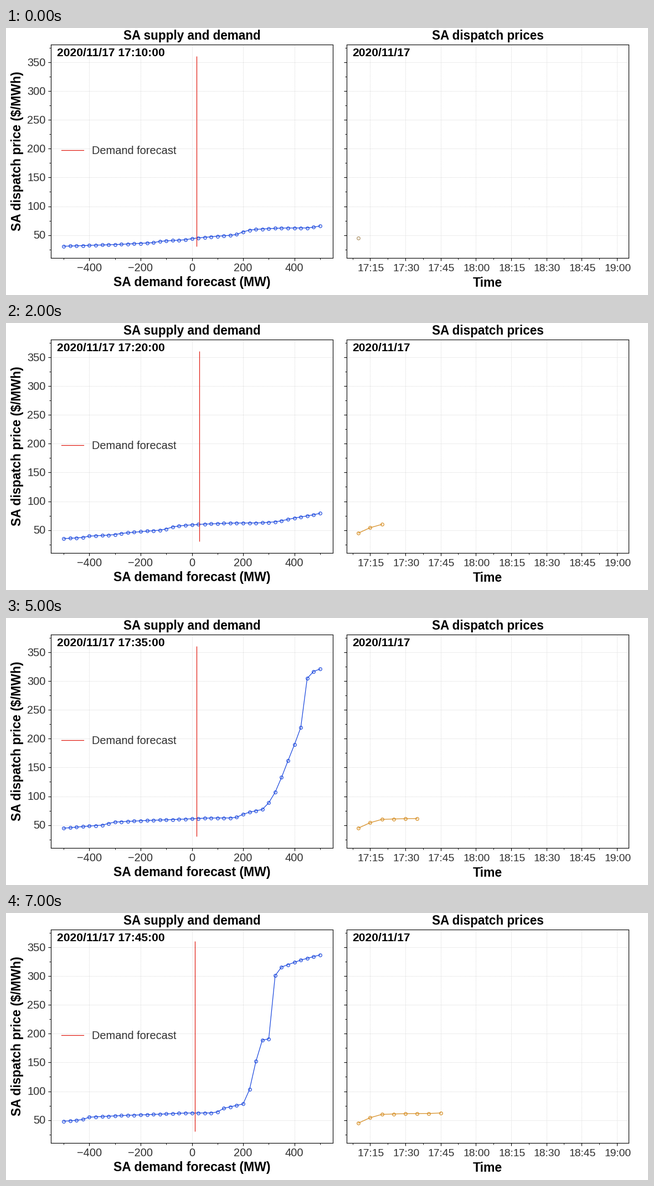
These frames come from a looping animation (1159 by 483 pixels, 8 s). A matplotlib script:

```python
import numpy as np
import matplotlib.pyplot as plt
from matplotlib.animation import FuncAnimation
from matplotlib.ticker import MultipleLocator

W, H, DPI = 1159, 483, 64
PX = 72 / DPI  # points per pixel
plt.rcParams["font.family"] = "Liberation Sans"

TOP, BOTTOM, AXES_WIDTH = 30, 416, 509
LEFT_SUPPLY, LEFT_PRICE = 81, 615
Y_LIM = (10.2, 381)
BLUE, RED = "#1644dd", "#e01a10"
TAN, ORANGE = np.array([0.67, 0.56, 0.38]), np.array([0.835, 0.54, 0.11])

DEMAND = np.arange(-500, 501, 25)
MINUTES = np.arange(10, 46, 5)  # after 17:00

# Bid stack at the end of the loop: key points of demand and price.
STACK = np.array([
    (-1100, 30.6), (-870, 34), (-750, 36.8), (-720, 39.5), (-630, 41.5),
    (-590, 44.5), (-500, 48), (-430, 50.2), (-402, 55), (-275, 57.8),
    (-125, 60.2), (-25, 62.2), (75, 62.4), (105, 64.5), (125, 70.5),
    (200, 78), (225, 103), (250, 152), (275, 189), (300, 191),
    (325, 301), (350, 316), (425, 328), (500, 337)]).T

# How far right of that each price level still lies at a given minute.
DRIFT_PRICES = (55, 60.5, 66, 150)
DRIFT = {10: (600, 370, 390, 800), 15: (430, 180, 290, 800),
         25: (210, 130, 220, 270), 30: (95, 100, 85, 160),
         40: (85, 80, 72, 77), 45: (0, 0, 0, 0)}


def supply(minute, demand):
    """Price on the stack after sliding each level left over time."""
    end, price = STACK
    drift = [np.interp(minute, list(DRIFT), level)
             for level in zip(*DRIFT.values())]
    position = end + np.interp(price, DRIFT_PRICES, drift)
    return np.interp(demand, np.maximum.accumulate(position), price)


forecast = np.interp(MINUTES, (10, 15, 20, 25, 30, 45),
                     (18.4, 22.7, 28.5, 28.5, 20.5, 12))
dispatch = [supply(m, d) for m, d in zip(MINUTES, forecast)]

fig = plt.figure(figsize=(W / DPI, H / DPI), dpi=DPI, facecolor="white")


def label(x, y, text, size=20, bold=False, ha="center", rotation=0):
    """Text with its baseline at pixel (x, y), counted from the top left."""
    return fig.text(x / W, 1 - y / H, text, size=size * PX, ha=ha,
                    va="baseline", rotation=rotation, rotation_mode="anchor",
                    weight="bold" if bold else "normal",
                    color="black" if bold else "#303030")


def panel(left, x_lim, x_step, title, x_label):
    ax = fig.add_axes([left / W, 1 - BOTTOM / H,
                       AXES_WIDTH / W, (BOTTOM - TOP) / H])
    ax.set(xlim=x_lim, ylim=Y_LIM)
    for axis, step in ((ax.xaxis, x_step), (ax.yaxis, 50)):
        axis.set_major_locator(MultipleLocator(step))
        axis.set_minor_locator(MultipleLocator(step / 2))
    ax.tick_params(which="major", length=5 * PX, width=1.1 * PX,
                   labelleft=False, labelbottom=False)
    ax.tick_params(which="minor", length=3 * PX, width=0.9 * PX)
    ax.grid(color="#c4c4c4", lw=0.8 * PX, ls=":")
    ax.set_axisbelow(True)
    for spine in ax.spines.values():
        spine.set_linewidth(1.1 * PX)
    center = left + AXES_WIDTH / 2
    label(center, 20.5, title, 22.5, bold=True)
    label(center, 467.5, x_label, 23, bold=True)
    return ax


def series(ax, color):
    return ax.plot([], [], "o-", color=color, lw=1.2 * PX, ms=5.6 * PX,
                   mfc="none", mew=1.15 * PX)[0]


supply_ax = panel(LEFT_SUPPLY, (-550, 550), 200,
                  "SA supply and demand", "SA demand forecast (MW)")
price_ax = panel(LEFT_PRICE, (5, 125), 15, "SA dispatch prices", "Time")

label(27.5, 223, "SA dispatch price ($/MWh)", 23, bold=True, rotation=90)
for price in range(50, 351, 50):
    y = BOTTOM - (price - Y_LIM[0]) / np.ptp(Y_LIM) * (BOTTOM - TOP)
    label(71.5, y + 6.5, str(price), ha="right")
for demand in range(-400, 401, 200):
    label(LEFT_SUPPLY + (demand + 550) * AXES_WIDTH / 1100, 440,
          str(demand).replace("-", "\u2212"))
for minute in range(15, 121, 15):
    label(LEFT_PRICE + 1.5 + (minute - 5) * AXES_WIDTH / 120, 440,
          f"{17 + minute // 60}:{minute % 60:02d}", 19.3)

clock = label(91.5, 51, "", 21, bold=True, ha="left")
label(625.5, 51, "2020/11/17", 21, bold=True, ha="left")
fig.add_artist(plt.Line2D([99.5 / W, 140 / W], [1 - 221 / H] * 2,
                          color=RED, lw=1.2 * PX))
label(155, 228, "Demand forecast", ha="left")

supply_line = series(supply_ax, BLUE)
forecast_line, = supply_ax.plot([], [], color=RED, lw=1.2 * PX,
                                solid_capstyle="butt")
price_line = series(price_ax, ORANGE)


def update(i):
    clock.set_text(f"2020/11/17 17:{MINUTES[i]}:00")
    supply_line.set_data(DEMAND, supply(MINUTES[i], DEMAND))
    forecast_line.set_data([forecast[i]] * 2, [30, 361])
    price_line.set_data(MINUTES[:i + 1], dispatch[:i + 1])
    color = TAN + (ORANGE - TAN) * min(i / 2, 1)
    price_line.set(color=color, markeredgecolor=color)
    return clock, supply_line, forecast_line, price_line


anim = FuncAnimation(fig, update, frames=len(MINUTES), interval=1000,
                     repeat=True, repeat_delay=0)
plt.show()
```
